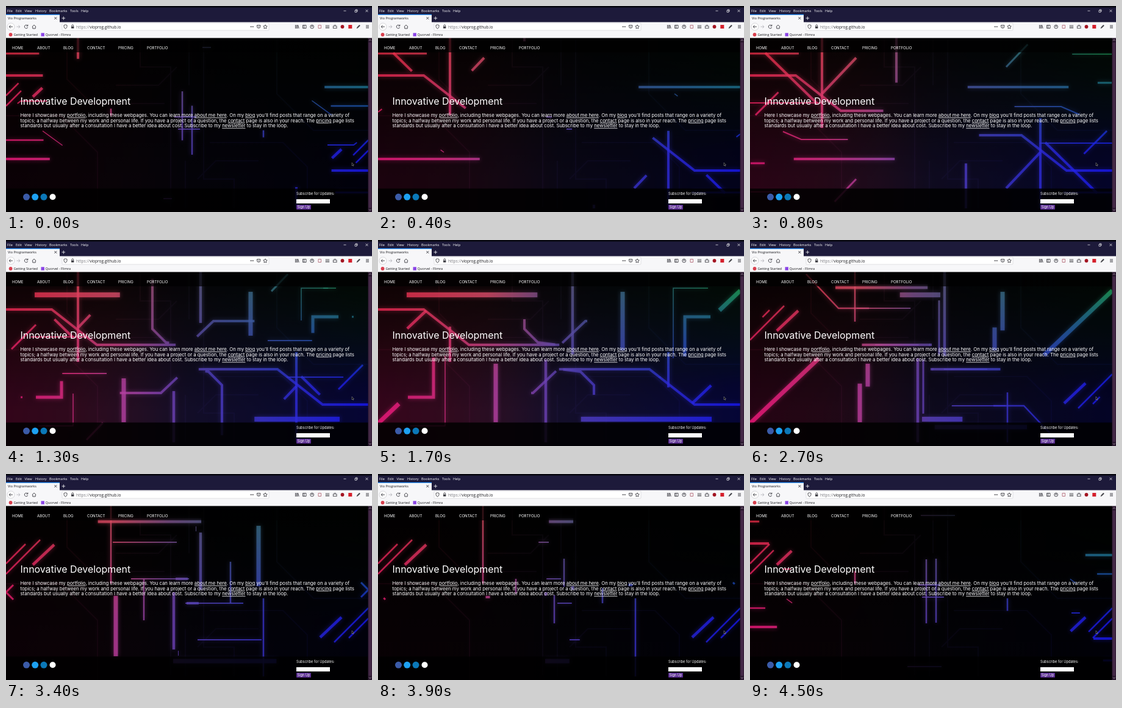
Animation, 600 px wide and 338 px high, one loop 4.6 s. Source, as an HTML page:

```html
<!DOCTYPE html>
<html lang="en">
<head>
<meta charset="utf-8">
<title>Innovative Development</title>
<style>
  html, body { margin: 0; width: 100%; height: 100%; overflow: hidden; background: #000; }
  svg { display: block; width: 100%; height: 100%; }
  .ui { font: 5.6px "Open Sans", "Noto Sans", sans-serif; }
  .page { font: 7.77px Inter, sans-serif; fill: #fff; }
  .link { text-decoration: underline; text-decoration-thickness: .5px; }
  .icon { fill: none; stroke: #3c3c42; stroke-width: .9; }
</style>
</head>
<body>
<svg viewBox="0 0 600 338" preserveAspectRatio="none">
  <defs>
    <linearGradient id="upper">
      <stop offset="0" stop-color="#f02c48"/>
      <stop offset=".3" stop-color="#d84c64"/>
      <stop offset=".45" stop-color="#7c5088"/>
      <stop offset=".6" stop-color="#44608c"/>
      <stop offset=".82" stop-color="#2a7c78"/>
      <stop offset="1" stop-color="#1fa05a"/>
    </linearGradient>
    <linearGradient id="lower">
      <stop offset="0" stop-color="#f4187c"/>
      <stop offset=".2" stop-color="#dc3088"/>
      <stop offset=".36" stop-color="#a844a8"/>
      <stop offset=".5" stop-color="#5840bc"/>
      <stop offset=".75" stop-color="#3430d4"/>
      <stop offset="1" stop-color="#1818f8"/>
    </linearGradient>
    <linearGradient id="fall" x2="0" y2="1">
      <stop offset=".1" stop-color="#fff" stop-opacity="0"/>
      <stop offset=".65" stop-color="#fff"/>
    </linearGradient>
    <linearGradient id="fog" x2="0" y2="1">
      <stop offset=".1" stop-color="#fff" stop-opacity=".3"/>
      <stop offset=".8" stop-color="#fff"/>
    </linearGradient>
    <filter id="blur" filterUnits="userSpaceOnUse" x="-20" y="30" width="640" height="330">
      <feGaussianBlur stdDeviation="3.5"/>
    </filter>
    <clipPath id="view"><rect y="52" width="594" height="286"/></clipPath>
    <mask id="descent" maskUnits="userSpaceOnUse" x="0" y="52" width="594" height="286">
      <rect y="52" width="594" height="286" fill="url(#fall)"/>
    </mask>
    <mask id="light" maskUnits="userSpaceOnUse" x="0" y="52" width="594" height="286">
      <rect id="haze" y="52" width="594" height="286" fill="url(#fog)"/>
      <g filter="url(#blur)" opacity=".6">
        <use href="#traces"/>
        <use href="#traces" transform="rotate(180 297 192)"/>
      </g>
      <g id="traces" fill="none" stroke="#fff" stroke-opacity=".76">
        <path stroke-opacity=".05" stroke-width="2" d="M100 52V120L140 160H260M0 180H90L150 240V338M220 52V100H270V330M300 52V130M180 130H250L280 100"/>
      </g>
      <use href="#traces" transform="rotate(180 297 192)"/>
    </mask>
  </defs>

  <rect width="600" height="338"/>
  <g clip-path="url(#view)">
    <g mask="url(#light)">
      <rect y="52" width="594" height="286" fill="url(#upper)"/>
      <rect y="52" width="594" height="286" fill="url(#lower)" mask="url(#descent)"/>
    </g>
    <rect y="52" width="594" height="24" fill-opacity=".7"/>
    <rect y="299.5" width="594" height="39" fill-opacity=".84"/>
  </g>

  <g class="page">
    <g id="nav" font-size="6.1"></g>
    <text x="23.5" y="162" font-size="15.9">Innovative Development</text>
    <text x="23.5" y="182">Here I showcase my <tspan class="link">portfolio</tspan>, including these webpages. You can learn more <tspan class="link">about me here</tspan>. On my <tspan class="link">blog</tspan> you'll find posts that range on a variety of</text>
    <text x="23.5" y="190.7">topics; a halfway between my work and personal life. If you have a project or a question, the <tspan class="link">contact</tspan> page is also in your reach. The <tspan class="link">pricing</tspan> page lists</text>
    <text x="23.5" y="199.4">standards but usually after a consultation I have a better idea about cost. Subscribe to my <tspan class="link">newsletter</tspan> to stay in the loop.</text>
    <text x="476" y="310.2" font-size="5.75">Subscribe for Updates:</text>
    <rect x="476" y="317" width="55" height="7"/>
    <rect x="476" y="326" width="24" height="8" rx="1" fill="#5a2d91"/>
    <text x="477.6" y="332" font-size="5.6">Sign Up</text>
    <circle cx="33.5" cy="313.3" r="5.5" fill="#3b5ba8"/>
    <circle cx="47.7" cy="313.3" r="5.5" fill="#1da1f2"/>
    <circle cx="62" cy="313.3" r="5.5" fill="#0b78b8"/>
    <circle cx="76.5" cy="313.3" r="5"/>
  </g>

  <rect x="593.5" y="52" width="6.5" height="286" fill="#2c1a30"/>
  <rect x="594.3" y="60" width="5" height="271" fill="#432946"/>
  <path d="M595 57l1.8-2 1.8 2M595 333.5l1.8 2 1.8-2" fill="none" stroke="#b9a9bb" stroke-width=".7"/>

  <g class="ui">
    <rect width="600" height="27" fill="#1d1a3a"/>
    <rect width="600" height="2.5" fill="#07070f"/>
    <g id="menu" fill="#fff"></g>
    <path d="M553.5 8h4M572 7.2h3v3h-3zM573 7v-1h3v3h-1M589.5 6l4 4m0-4l-4 4" fill="none" stroke="#fff" stroke-width=".7"/>
    <rect y="14" width="88" height="13" fill="#f7f7f9"/>
    <rect y="13.6" width="88" height="1.1" fill="#0a84ff"/>
    <text x="3" y="22.3" font-size="5.5" fill="#16161a">Vio Programworks</text>
    <path d="M79.3 18l4 4m0-4l-4 4" class="icon"/>
    <path d="M91.5 20h5.6M94.3 17.2v5.6" stroke="#fff" stroke-width=".8"/>

    <rect y="26.5" width="600" height="26" fill="#f7f7f9"/>
    <rect x="92" y="28" width="339" height="12" rx="1" fill="#fff" stroke="#cfcfd4" stroke-width=".6"/>
    <g class="icon">
      <circle cx="8" cy="34" r="6" fill="#fff" stroke="#bcbcc2" stroke-width=".6"/>
      <path d="M11 34H5.2m2.5-2.5L5.2 34l2.5 2.5"/>
      <path d="M17.5 34H23m-2.4-2.4L23 34l-2.4 2.4" stroke="#b5b5ba"/>
      <path d="M35.5 32.5a2.8 2.8 0 1 0 .2 2.5M35.8 30.5v2.4h-2.4"/>
      <path d="M42.8 34.2L46 31l3.2 3.2M43.8 34v3h4.4v-3"/>
      <path d="M95 31.5l2.5-.8 2.5.8v2q0 2.5-2.5 3.8-2.5-1.3-2.5-3.8z"/>
      <path d="M107.8 33.5v-1.3a1.4 1.4 0 0 1 2.8 0v1.3"/>
      <rect x="107" y="33.5" width="4.4" height="3.2" fill="#3c3c42" stroke="none"/>
      <path d="M400.5 34h5.5" stroke-width="1.3" stroke-dasharray="1.3 .8"/>
      <path d="M411.5 31.5h5.4v2.2a2.7 2.7 0 0 1-5.4 0zM412.8 33.3l1.4 1.3 1.4-1.3"/>
      <path d="M425 30.8l1 2.1 2.3.3-1.7 1.6.4 2.3-2-1.1-2 1.1.4-2.3-1.7-1.6 2.3-.3z"/>
      <path d="M474.5 31v6m1.8-6v6m1.6-6v6m.8-5.8l1.5 5.7"/>
      <path d="M486.5 31.5h5.5v5h-5.5zM488.7 31.5v5"/>
      <circle cx="501.7" cy="34" r="2.9"/><circle cx="501.7" cy="33.3" r=".8"/>
      <path d="M512 31.5h4.5v5H512z" stroke="#b46a78"/>
      <path d="M524 32.2h6m-6 1.9h6m-6 1.9h6" stroke-width="1.3" stroke-dasharray="1.4 .8"/>
      <path d="M536.5 33h5.5v3.5h-5.5zM537.5 31.5h3.5" stroke="#66666c" stroke-width="1.2"/>
      <path d="M575 36.8l1-2.4 3.3-3.3 1.2 1.2-3.3 3.3z" fill="#3c3c42" stroke-width=".5"/>
      <path d="M590 32h5m-5 2h5m-5 2h5"/>
    </g>
    <circle cx="551.5" cy="34" r="2.9" fill="#a31522"/>
    <rect x="561.3" y="31" width="6" height="6" fill="#d5202c"/>
    <text x="115" y="36.5" font-size="6.5" fill="#77777d">https://<tspan fill="#1b1b20">vioprog.github.io</tspan></text>
    <circle cx="7.6" cy="47" r="2.9" fill="#d8404e"/>
    <rect x="57.5" y="44.3" width="5.4" height="5.4" fill="#8b45e6"/>
    <text x="12.5" y="49.2" fill="#16161a">Getting Started</text>
    <text x="64.5" y="49.2" fill="#16161a">Quorvel - Flimra</text>
  </g>
  <path d="M567 257v5l1.2-1 .8 1.7.7-.3-.8-1.7h1.6z" fill="#000" stroke="#ccc" stroke-width=".4"/>
</svg>
<script>
const NS = 'http://www.w3.org/2000/svg';
const STEPS = 46, STEP_MS = 100;
const byId = id => document.getElementById(id);

function add(parent, tag, attrs, text = '') {
  const node = document.createElementNS(NS, tag);
  for (const key in attrs) node.setAttribute(key, attrs[key]);
  node.textContent = text;
  return parent.appendChild(node);
}

function labels(parent, y, items) {
  for (const [text, x] of Object.entries(items)) add(parent, 'text', { x, y }, text);
}
labels(byId('menu'), 9.6, { File: 2, Edit: 16, View: 30.5, History: 48, Bookmarks: 71, Tools: 105, Help: 123 });
labels(byId('nav'), 71, { HOME: 10, ABOUT: 51, BLOG: 94, CONTACT: 133, PRICING: 184, PORTFOLIO: 231 });

// A pulse enters its path at `start` and drains from `end`, each over `span` steps.
const traces = [];
function trace(d, width, start, end, span) {
  const node = add(byId('traces'), 'path', { d, 'stroke-width': width, pathLength: 1 });
  traces.push({ node, start, hold: end - start, span });
}

// edge runs
trace('M0 251H254L292 215', 4, 43.5, 51.5, 20);
trace('M0 114H75L149 172H298', 4, 44, 65, 20);
trace('M118 52V200', 4, 45, 60, 8);
trace('M0 220H82', 2.5, 44.5, 47, 3);
trace('M0 78H80', 3, 44.7, 54, 3);
trace('M60 205L108 240', 1.5, 44.7, 48, 3);
trace('M67 156H24L0 174', 2, 44.7, 48, 3);

// corner clusters
trace('M240 52V146L262 168L295 172', 4, 3.7, 12.4, 16);
trace('M0 159H134', 2, 4, 12, 6);
trace('M174 85L118 144', 4, 3, 11, 5);
trace('M25 77L110 160', 4, 3, 11, 5);
trace('M9 179L49 139', 3, 5, 13, 4);
trace('M54 206L84 219H165', 2, 4, 12, 5);
trace('M420 100L462 56', 3, 5, 12, 5);
trace('M593 79H520', 1.5, 6, 11, 3);
trace('M593 126H567', 3, 6, 11, 3);

// heavy bars
trace('M47 90H312', 8, 8, 19, 16);
trace('M193 299V203', 7, 9, 24, 8);
trace('M0 301L112 195', 7, 16, 27, 6);
trace('M180 299V200', 7, 25, 35, 5);
trace('M140 77H320', 7, 21, 33.7, 10);

// inner circuit
trace('M319 52V190', 4.5, 10, 32.6, 8);
trace('M310 60V188', 3, 18, 26, 6);
trace('M49 258H91V193', 5, 11, 18, 5);
trace('M53 305H110V190', 1.5, 11, 18, 5);
trace('M172 52V180', 2.5, 23, 39, 10);
trace('M92 56L145 112H195', 2.5, 17, 28, 5);
trace('M175 112H280', 2, 24, 36, 5);
trace('M205 172H300', 2, 24, 36, 6);
trace('M226 240V172', 2.5, 28, 37, 5);

// slanted dashes and centre marks
trace('M79 116L44 149', 4.5, 13, 44, 6);
trace('M56 108L0 164', 2.5, 17, 44, 6);
trace('M32 115L0 147', 2.5, 26, 45, 5);
trace('M289 245V140', 2.5, 38, 45.5, 4);
trace('M280 68H336', 2, 40, 45, 2);
trace('M282 202H318', 2, 41, 48, 4);
trace('M12 182L0 194L12 206', 3, 31, 37, 3);

function easeOut(u) {
  const rest = 1 - Math.min(1, Math.max(0, u));
  return 1 - rest * rest;
}

function render(step) {
  for (const { node, start, hold, span } of traces) {
    const age = (step - start + STEPS) % STEPS;
    const head = easeOut(age / span);
    const tail = easeOut((age - hold) / span);
    node.style.display = head - tail > .002 ? '' : 'none';
    node.setAttribute('stroke-dasharray', `${head - tail} 2`);
    node.setAttribute('stroke-dashoffset', -tail);
  }
  const swell = Math.max(0, Math.sin(Math.PI * (step + 1) / 36));
  byId('haze').setAttribute('opacity', .03 + .19 * swell);
}

const began = performance.now();
let shown = -1;
function tick() {
  const step = Math.floor((performance.now() - began) / STEP_MS) % STEPS;
  if (step !== shown) render(shown = step);
  requestAnimationFrame(tick);
}
tick();
</script>
</body>
</html>
```
